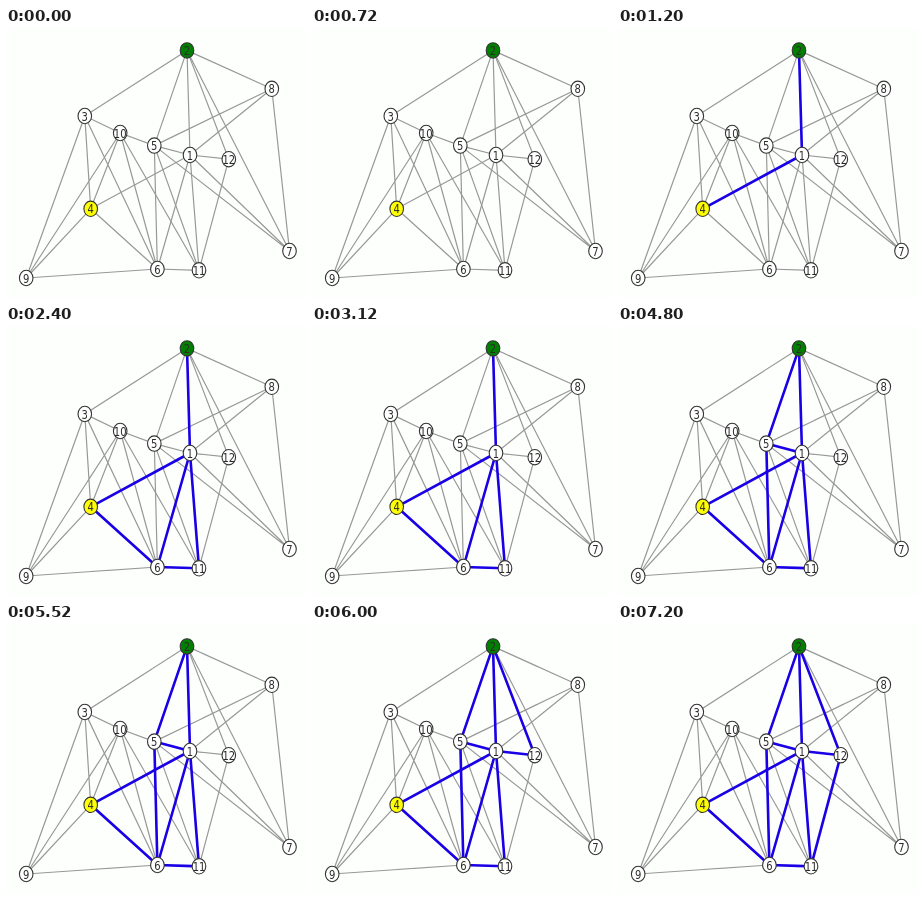
An HTML page for the animation above (8 s loop, 300 px wide and 270 px high).

```html
<!DOCTYPE html>
<html lang="en">
<head>
<meta charset="utf-8">
<title>Graph paths</title>
<style>
  html, body { margin: 0; width: 100%; height: 100%; overflow: hidden; background: #fdfffd; }
  svg { display: block; width: 100vw; height: 100vh; }
  polyline { fill: none; stroke-linejoin: round; }
  .edge { stroke: #989898; stroke-width: 1.2; }
  .path { stroke: #1a00e6; stroke-width: 2.6; }
  ellipse { fill: #fff; stroke: #333; stroke-width: 1.1; }
  .start { fill: #008000; }
  .end { fill: #ffff00; }
  text { font: 12.2px "DejaVu Sans", sans-serif; text-anchor: middle; fill: #2c2c2c; }
</style>
</head>
<body>
<svg id="stage" viewBox="0 0 300 270"></svg>
<script>
const LOOP = 8000, STEP = 1200;
const START = 2, END = 4;

// Centres of nodes 1 to 12
const nodes = [
  [184, 127], [181, 22.4], [78.8, 88], [84.7, 180.8], [148.3, 117.6], [151.4, 241],
  [283.5, 223], [265.8, 60.8], [20.2, 250], [114.2, 105], [193, 242.3], [222.8, 131.2]
];
// Walks through the graph: each path lights up one step after the last
const paths = ['2 1 4', '4 6 11 1 6', '2 5 6', '5 1', '2 12 1', '12 11'];
const others = ['2 7 8 2 3 10 5 8 1 7 5 11 10 6', '3 6 9 3 4 9 10 4'];

const stage = document.getElementById('stage');

function add(tag, attrs, text = '') {
  const el = document.createElementNS('http://www.w3.org/2000/svg', tag);
  for (const key in attrs) el.setAttribute(key, attrs[key]);
  el.textContent = text;
  return stage.appendChild(el);
}

function addWalk(walk, cls) {
  const points = walk.split(' ').map(id => nodes[id - 1]).join(' ');
  return add('polyline', { class: cls, points });
}

[...others, ...paths].forEach(walk => addWalk(walk, 'edge'));
const lit = paths.map(walk => addWalk(walk, 'path'));

nodes.forEach(([cx, cy], i) => {
  const id = i + 1;
  const cls = id === START ? 'start' : id === END ? 'end' : 'node';
  add('ellipse', { class: cls, cx, cy, rx: 6.8, ry: 7.7 });
  // Labels share the narrow aspect of the nodes
  add('text', { transform: `translate(${cx} ${cy + 4.5}) scale(.82 1)` }, id);
});

const begin = performance.now();

function draw(now) {
  const step = Math.floor((Math.max(0, now - begin) % LOOP) / STEP);
  lit.forEach((line, i) => {
    line.style.visibility = i < step ? 'visible' : 'hidden';
  });
  requestAnimationFrame(draw);
}
draw(begin);
</script>
</body>
</html>
```
